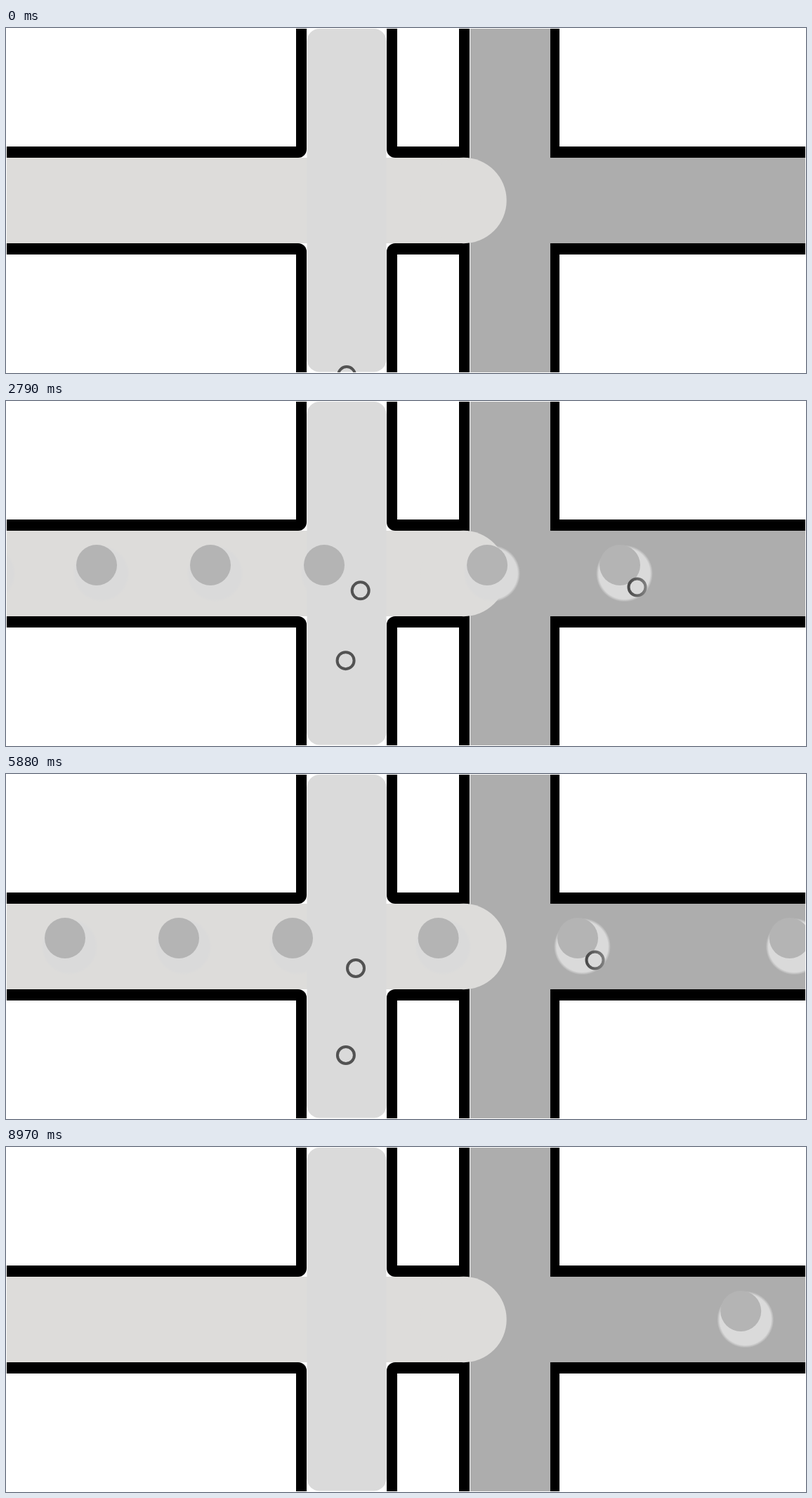
Recreate the animation shown at these times as an HTML page with a canvas. Size 1139x492 px, loop 9 s.

```html
<!DOCTYPE html>
<html lang="en">
<head>
<meta charset="utf-8">
<title>Droplet junction</title>
<style>
  html, body { margin: 0; width: 100%; height: 100%; overflow: hidden; background: #fff; }
  canvas { display: block; }
</style>
</head>
<body>
<canvas id="stage" width="1139" height="492"></canvas>
<script>
const ctx = document.getElementById('stage').getContext('2d');
const LOOP = 9000, STEP = 30;
const FIRST = 200, GAP = 540, DROPS = 12;   // time of first drop at x = 0, spacing, count
const MERGE = 1620;                         // age at which a drop meets its ring
const LIGHT = '#dddcda', CHANNEL = '#dadada', DARK = '#adadad';

// Ring path before merging: age, x, y
const RING_PATH = [
  [-540, 486, 557], [0, 484.5, 458.6], [460, 483.5, 364], [720, 483.5, 310.5],
  [910, 485, 301], [1360, 498, 277], [1540, 506, 269], [MERGE, 510.5, 265.5]
];

function rect(color, x, y, w, h, radii = 0) {
  ctx.fillStyle = color;
  ctx.beginPath();
  ctx.roundRect(x, y, w, h, radii);
  ctx.fill();
}

function disc(fill, x, y, r) {
  ctx.fillStyle = fill;
  ctx.beginPath();
  ctx.arc(x, y, r, 0, 2 * Math.PI);
  ctx.fill();
}

function drawPipes() {
  rect('#fff', 0, 0, 1139, 492);

  // Right junction
  rect('#000', 645, 1, 143, 490);
  rect('#000', 788, 169, 350, 154);
  rect('#fff', 660, 1, 1, 490);
  rect(DARK, 661, 1, 114, 490);
  rect(DARK, 661, 185, 477, 122);

  // Left pipe with its rounded front
  rect('#000', 1, 169, 412, 154);
  rect('#000', 557, 169, 88, 154);
  rect(LIGHT, 1, 185, 650, 122);
  disc(LIGHT, 651.5, 246, 61.2);

  // Side channel walls, rounded where they meet the pipe
  const r = 12;
  rect('#000', 413, 1, 15, 184, [0, 0, r, 0]);
  rect('#000', 413, 307, 15, 184, [0, r, 0, 0]);
  rect('#000', 542, 1, 15, 184, [0, 0, 0, r]);
  rect('#000', 542, 307, 15, 184, [r, 0, 0, 0]);
  rect(CHANNEL, 428.5, 1, 113, 489.5, 18);
}

const carriesRing = k => k % 2 === 0;

function dropX(k, age) {
  const speed = carriesRing(k) ? 0.4 : 0.463;
  return 0.3 * Math.min(age, MERGE) + speed * Math.max(0, age - MERGE);
}

function drawDrop(x) {
  const cx = x + 6.5, cy = 246;
  const halo = ctx.createRadialGradient(cx, cy, 36.5, cx, cy, 40.5);
  halo.addColorStop(0, CHANNEL);
  halo.addColorStop(1, '#dadada00');
  disc(halo, cx, cy, 40.5);
  disc('#b4b4b4', x, 234, 29);
}

function ringAt(k, age) {
  if (age >= MERGE) return [dropX(k, age) + 24.5, 265.5];
  const i = RING_PATH.findIndex(p => p[0] > age);
  const [t0, x0, y0] = RING_PATH[i - 1], [t1, x1, y1] = RING_PATH[i];
  const f = (age - t0) / (t1 - t0);
  return [x0 + f * (x1 - x0), y0 + f * (y1 - y0)];
}

function drawRing(x, y) {
  ctx.strokeStyle = '#525252';
  if (x > 713) {
    const shade = ctx.createLinearGradient(x - 13, 0, x + 13, 0);
    shade.addColorStop(0, '#484848');
    shade.addColorStop(1, '#808080');
    ctx.strokeStyle = shade;
  }
  ctx.lineWidth = 4;
  ctx.beginPath();
  ctx.arc(x, y, 12, 0, 2 * Math.PI);
  ctx.stroke();
}

function draw(t) {
  drawPipes();
  ctx.save();
  ctx.beginPath();
  ctx.rect(1, 1, 1137, 490);
  ctx.clip();
  for (let k = 0; k < DROPS; k++) drawDrop(dropX(k, t - FIRST - k * GAP));
  for (let k = 0; k < DROPS; k++) {
    const age = t - FIRST - k * GAP;
    if (carriesRing(k) && age >= RING_PATH[0][0]) drawRing(...ringAt(k, age));
  }
  ctx.restore();
}

const start = performance.now();
function tick() {
  const t = (performance.now() - start) % LOOP;
  draw(Math.floor(t / STEP) * STEP);
  requestAnimationFrame(tick);
}
tick();
</script>
</body>
</html>
```
